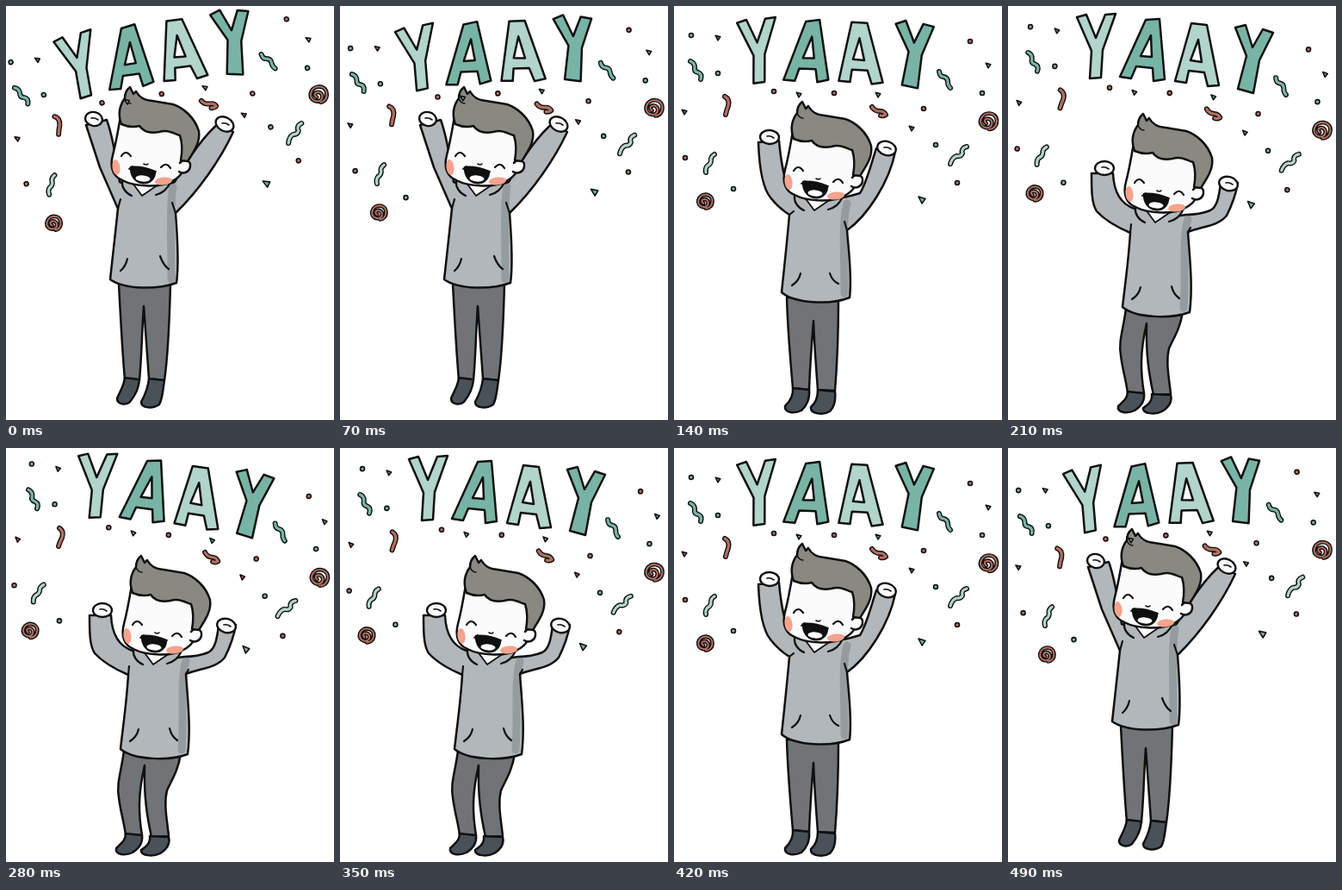
Write an HTML page that moves like this. It is 381 px wide and 480 px high and loops after 560 ms.

```html
<!DOCTYPE html>
<html lang="en">
<head>
<meta charset="utf-8">
<title>Yaay</title>
<style>
  html, body { margin: 0; width: 100%; height: 100%; overflow: hidden; background: #fff; }
  svg { display: block; width: 100%; height: 100%; }
  path, ellipse, circle { stroke-linecap: round; stroke-linejoin: round; }
</style>
</head>
<body>
<svg id="stage" viewBox="0 0 381 480" role="img" aria-label="YAAY"></svg>
<script>
const INK = '#101010', TEAL = '#78b4a5', MINT = '#b1d4cb', RUST = '#b46f60';
const GREY = '#b1b7ba', SHADE = '#959ca0', TROUSER = '#707476', SHOE = '#4a5259';

const STEP = 70;
const POSES = [0, 0, 1, 2, 2, 2, 1, 0];
const TILT = [-10.1, -5, 0, 3.4, 5.4, 3.4, 0, -5];
const PIVOT = '189 131';

const path = (d, fill = 'none', stroke = INK, width = 2.5) =>
  `<path d="${d}" fill="${fill}" stroke="${stroke}" stroke-width="${width}" fill-rule="evenodd"/>`;
const line = (d, width = 2.2) => path(d, 'none', INK, width);
const ribbon = (d, color, width = 3.2) =>
  path(d, 'none', INK, width + 2.8) + path(d, 'none', color, width);
const oval = (x, y, rx, ry, turn, fill, stroke = 'none') =>
  `<ellipse cx="${x}" cy="${y}" rx="${rx}" ry="${ry}" transform="rotate(${turn} ${x} ${y})" fill="${fill}" stroke="${stroke}" stroke-width="2.3"/>`;
const dot = (x, y, color) =>
  `<circle cx="${x}" cy="${y}" r="2.5" fill="${color}" stroke="${INK}" stroke-width="1.6"/>`;
const chip = (x, y, color, size = 2.8) =>
  path(`M${x - size} ${y - size}l${size * 2} ${size * .6}l${-size} ${size * 1.4}z`, color, INK, 1.6);

// Open curl: a short tail that winds once around a hollow middle.
const curl = (x, y, size) => {
  const k = n => n * size;
  return ribbon(`M${x - k(.2)} ${y + k(.3)}c${k(-.6)} ${k(-.5)} ${k(.5)} ${k(-.8)} ${k(.6)} ${k(-.1)}` +
    `c0 ${k(.9)} ${k(-1.4)} ${k(.6)} ${k(-1.2)} ${k(-.3)}c${k(.3)} ${k(-1)} ${k(1.7)} ${k(-.8)} ${k(1.7)} ${k(.1)}` +
    `c0 ${k(.6)} ${k(-.4)} ${k(.9)} ${k(-.8)} ${k(.9)}`, RUST, 2);
};

const letters = [
  ['M80 13L91 10L102 37L113 10L125 9L110 51L108 83L95 84L97 52Z', MINT],
  ['M160 16L176 15L182 85L169 87L168 72L149 70L143 84L130 82ZM166 34L167 59L154 58Z', TEAL],
  ['M213 20L231 22L245 92L232 93L228 77L210 75L207 89L194 87ZM221 39L225 65L212 63Z', MINT],
  ['M264 25L276 22L284 48L296 27L308 31L292 63L285 101L267 96L277 58Z', TEAL]
].map(([d, color]) => path(d, color)).join('');

const confetti = [
  ribbon('M19 64q5 2 5 7q-1 5 4 6q5 2 3 8', TEAL),
  ribbon('M59 105q6 3 4 11q-2 5 -3 10', RUST),
  ribbon('M47 172q-5 3 -4 8q-1 4 -4 5q-3 3 -2 8', MINT),
  ribbon('M230 117q3 5 9 5q5 0 7 4q-3 2 -6 1', RUST),
  ribbon('M308 76q1 6 5 6q5 1 5 6q0 4 3 7', TEAL),
  ribbon('M340 163q-7 2 -5 8q-2 4 -7 3q-5 2 -7 9', MINT),
  curl(365, 133, 11), curl(36, 226, 9.5),
  dot(20, 34, TEAL), dot(51, 78, TEAL), dot(13, 176, RUST),
  dot(116, 99, RUST), dot(186, 101, RUST), dot(344, 41, RUST),
  dot(358, 101, TEAL), dot(290, 119, RUST), dot(304, 161, TEAL), dot(329, 205, RUST),
  chip(51, 37, RUST), chip(12, 123, RUST), chip(145, 103, TEAL),
  chip(237, 103, TEAL), chip(365, 69, TEAL), chip(276, 142, RUST),
  chip(288, 225, TEAL, 4),
  `<g id="stray">${dot(69, 212, TEAL)}</g>`
].join('');

const head = [
  path('M133 128C130 146 128 158 124 173C120 188 125 198 135 202C150 210 181 211 193 203C199 200 203 196 205 192L208 140Z', '#fbfbfb'),
  oval(128, 187, 4.5, 9, -8, '#f4a38d'),
  oval(183, 203, 10, 4.5, -6, '#f4a38d'),
  path('M202 182C206 176 215 179 214 186C213 193 206 195 201 192', '#fbfbfb'),
  path('M134 137C130 126 132 115 138 107C138 102 140 97 144 94L148 102L151 99C155 106 160 109 170 110L194 114C206 118 219 129 224 145C226 158 218 169 211 180L203 179C205 168 205 159 202 150C193 147 187 143 178 146C167 148 159 145 155 139C148 141 141 140 134 137Z', '#8a8981'),
  line('M138 107q2 6 7 6', 1.5),
  line('M134 174q5 -8 11 0'), line('M180 187q6 -7 11 1'),
  line('M160 183q3 2 5 0', 1.6),
  path('M145 187Q159 186 173 192C173 201 166 206 158 205C150 204 145 197 145 187Z', INK),
  oval(159, 200, 8.5, 3.6, 4, '#fff'),
  line('M143 189l4 -3', 1.8), line('M171 193l3 -1', 1.8)
].join('');

const poses = [
  {
    legs: 'M131 322C133 360 135 400 138 433L155 434C158 400 158 372 160 348C162 375 164 402 166 432L184 434C189 400 190 360 191 322Z',
    shoes: ['M138 431L155 433C154 446 149 453 144 459C138 464 129 461 129 455C132 447 137 441 138 431Z',
      'M166 432L184 434C182 446 182 455 178 462C171 467 157 467 157 459C162 450 165 443 166 432Z'],
    body: 'M93 138L109 187L130 235C127 264 124 289 121 317C138 329 176 329 198 321C201 300 199 266 197 240C224 214 249 178 264 146L247 136C229 151 211 178 196 204Q160 217 132 204C128 176 124 151 117 132Z',
    shade: 'M194 210C190 229 192 268 192 317',
    lines: ['M130 235L133 224', 'M197 240L193 228', 'M141 293Q139 302 133 307', 'M179 290Q183 301 189 305'],
    hands: [[102, 131, 10, 8, 12], [254, 137, 11, 8, 28]],
    head: [0, 0]
  },
  {
    legs: 'M131 338C132 375 135 409 138 443L157 445C158 415 160 392 162 365C163 394 165 418 167 445L187 446C190 409 191 372 191 338Z',
    shoes: ['M138 443L157 445C158 455 154 464 148 469C140 473 128 472 129 464C135 458 139 452 138 443Z',
      'M167 445L187 447C188 456 186 465 181 470C173 475 158 473 159 465C165 460 167 453 167 445Z'],
    body: 'M98 158C99 187 103 211 112 222C119 231 126 237 134 242C131 277 128 303 125 332C140 345 182 347 204 338C207 314 203 286 201 260C225 243 250 204 257 169L235 165C228 186 224 204 216 217Q170 232 136 216C127 200 124 179 122 156Z',
    shade: 'M201 229C195 249 198 290 198 333',
    lines: ['M134 242L139 238', 'M201 260L198 250', 'M147 310Q145 319 137 324', 'M181 310Q184 319 191 322'],
    hands: [[111, 152, 11, 8, 3], [247, 165, 11, 8, 16]],
    head: [5, 17]
  },
  {
    legs: 'M137 351C134 375 128 389 131 405C133 422 137 433 139 449L158 449C154 425 153 402 161 368C160 405 164 428 169 451L189 450C187 430 183 413 187 397C193 384 200 374 203 354Z',
    shoes: ['M139 447L158 449C159 457 155 464 147 469C139 473 126 472 128 464C134 458 139 455 139 447Z',
      'M167 450L189 451C191 459 187 465 179 470C171 474 156 473 157 466C163 462 168 458 167 450Z'],
    body: 'M97 194C97 213 97 229 103 238C113 249 128 257 142 263C140 296 136 322 133 349C148 362 190 363 211 355C215 326 211 291 209 262C226 255 243 256 254 243C260 231 265 217 267 205L247 206C245 221 243 233 235 237C225 241 216 242 207 242Q170 249 147 235C132 230 123 218 122 194Z',
    shade: 'M209 247C202 270 207 309 204 350',
    lines: ['M142 263L143 253', 'M209 262L212 257', 'M154 326Q152 335 144 340', 'M190 325Q192 334 199 339'],
    hands: [[112, 188, 11, 8, 0], [256, 206, 11, 8, 14]],
    head: [13, 31]
  }
];

const collar = path('M135 200Q134 213 146 220L158 219L174 219Q187 216 192 203Z', GREY, 'none') +
  line('M135 203Q134 214 146 220') + line('M191 204Q186 216 174 219') +
  path('M146 204L158 220L177 207Z', '#fbfbfb', INK, 1.8);

function figure(p) {
  return path(p.legs, TROUSER) +
    p.shoes.map(d => path(d, SHOE)).join('') +
    path(p.body, GREY, 'none') + path(p.shade, 'none', SHADE, 9) + path(p.body) +
    p.lines.map(d => line(d)).join('') +
    p.hands.map(h => oval(...h, '#fbfbfb', INK) + line(`M${h[0] - 3} ${h[1] - 1}q4 -1 8 2`, 1.6)).join('') +
    `<g transform="translate(${p.head})">${collar}${head}</g>`;
}

const stage = document.getElementById('stage');
stage.innerHTML = poses.map(p => `<g class="pose">${figure(p)}</g>`).join('') +
  `<g id="swing">${confetti}<g transform="rotate(-3.4 ${PIVOT})">${letters}</g></g>`;

const figures = [...document.querySelectorAll('.pose')];
const swing = document.getElementById('swing');
const stray = document.getElementById('stray');

function draw(time) {
  const step = Math.floor(time / STEP) % POSES.length;
  figures.forEach((g, i) => g.setAttribute('visibility', i === POSES[step] ? 'visible' : 'hidden'));
  swing.setAttribute('transform', `rotate(${TILT[step]} ${PIVOT})`);
  stray.setAttribute('opacity', step ? 1 : 0);
}

let start;
function tick(now) {
  start ??= now;
  draw(now - start);
  requestAnimationFrame(tick);
}
draw(0);
requestAnimationFrame(tick);
</script>
</body>
</html>
```
